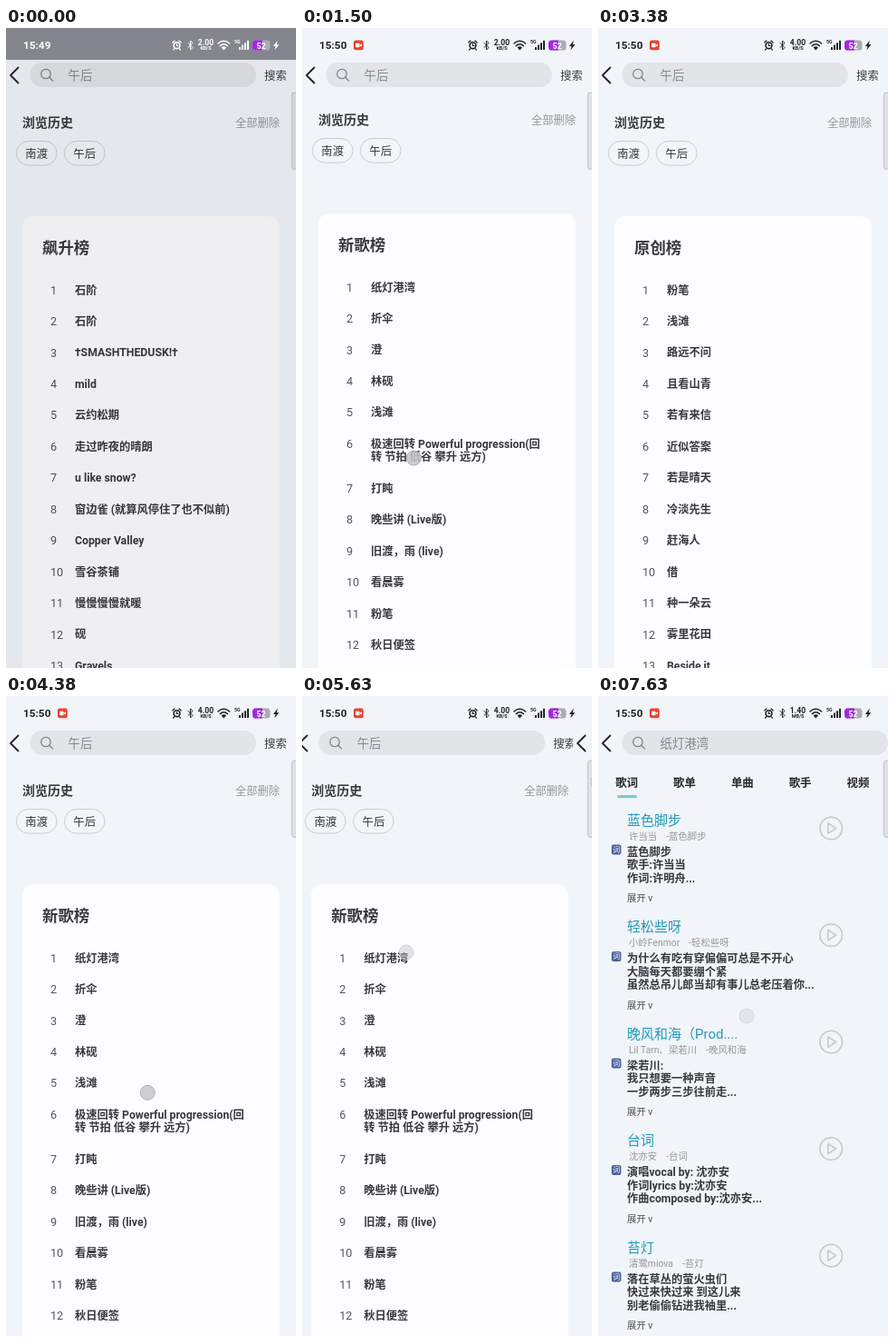
Recreate the animation shown at these times as an HTML page. Size 320x704 px, loop 7.76 s.

```html
<!DOCTYPE html>
<html lang="zh-CN">
<head>
<meta charset="utf-8">
<title>音乐搜索</title>
<style>
html, body { margin: 0; width: 100%; height: 100%; overflow: hidden; background: #f1f4f9; }
svg { display: block; width: 100vw; height: 100vh; }
text { font-family: Roboto, "Noto Sans CJK SC", "Noto Sans CJK", sans-serif; white-space: pre; }
</style>
</head>
<body>
<svg id="stage" viewBox="0 0 320 704" preserveAspectRatio="none"></svg>
<script>
const LOOP = 7760, STEP = 125, CARD_GAP = 284, PIVOT_Y = 610, ROW = 34.45, LINE = 14.5;
const BG = '#f1f4f9', INK = '#38393e', GREY = '#95979c', PALE = '#c5c7cb';
const MIDDLE = 'text-anchor="middle"';

// Text placed by the vertical middle of its line
const label = (x, y, s, size, fill = INK, weight = 400, more = '') =>
  `<text x="${x}" y="${y + size * 0.37}" font-size="${size}" fill="${fill}" font-weight="${weight}" ${more}>${s}</text>`;
const box = (x, y, w, h, r, fill, more = '') =>
  `<rect x="${x}" y="${y}" width="${w}" height="${h}" rx="${r}" fill="${fill}" ${more}/>`;
const line = (d, color, width) =>
  `<path d="${d}" fill="none" stroke="${color}" stroke-width="${width}" stroke-linecap="round" stroke-linejoin="round"/>`;
const ring = (x, y, r, color, width) =>
  `<circle cx="${x}" cy="${y}" r="${r}" fill="none" stroke="${color}" stroke-width="${width}"/>`;

const charts = [
  ['飙升榜', ['石阶', '石阶', '†SMASHTHEDUSK!†', 'mild', '云约松期', '走过昨夜的晴朗', 'u like snow?',
    '窗边雀 (就算风停住了也不似前)', 'Copper Valley', '雪谷茶铺', '慢慢慢慢就暖', '砚', 'Gravels']],
  ['新歌榜', ['纸灯港湾', '折伞', '澄', '林砚', '浅滩', '极速回转 Powerful progression(回|转 节拍 低谷 攀升 远方)',
    '打盹', '晚些讲 (Live版)', '旧渡，雨 (live)', '看晨雾', '粉笔', '秋日便签', '远处炊烟', '半盏', '石阶']],
  ['原创榜', ['粉笔', '浅滩', '路远不问', '且看山青', '若有来信', '近似答案', '若是晴天', '冷淡先生',
    '赶海人', '借', '种一朵云', '雾里花田', 'Beside it']]
];

const results = [
  ['蓝色脚步', '许当当', '蓝色脚步', ['蓝色脚步', '歌手:许当当', '作词:许明舟...']],
  ['轻松些呀', '小岭Fenmor', '轻松些呀', ['为什么有吃有穿偏偏可总是不开心', '大脑每天都要绷个紧', '虽然总吊儿郎当却有事儿总老压着你...']],
  ['晚风和海（Prod....', 'Lil Tarn、梁若川', '晚风和海', ['梁若川:', '我只想要一种声音', '一步两步三步往前走...']],
  ['台词', '沈亦安', '台词', ['演唱vocal by: 沈亦安', '作词lyrics by:沈亦安', '作曲composed by:沈亦安...']],
  ['苔灯', '清鹭miova', '苔灯', ['落在草丛的萤火虫们', '快过来快过来 到这儿来', '别老偷偷钻进我袖里...']]
];

const tabs = ['歌词', '歌单', '单曲', '歌手', '视频'];

const lines = (x, y, list) => list.map((s, i) => label(x, y + i * LINE, s, 12.25, INK, 700)).join('');

function chartCard([title, songs]) {
  let y = 288;
  const rows = songs.map((song, i) => {
    const parts = song.split('|');
    const row = label(49, y, i + 1, 12.6, '#55565b') + lines(76, y, parts);
    y += ROW + (parts.length - 1) * LINE;
    return row;
  });
  return `<g class="card">${box(18, 207, 284, 806, 12, '#fdfcfe')}${label(40, 242, title, 17.4, INK, 700)}${rows.join('')}</g>`;
}

const searchBar = (query, width) =>
  line('M13.5 43.5L5 52L13.5 60.5', '#24252a', 1.8) +
  box(26.5, 38, width, 27, 13.5, '#e2e4e8') +
  ring(44, 50.5, 5.2, '#84868c', 1.3) +
  line('M48 54.5L51.5 58', '#84868c', 1.3) +
  label(68.5, 52, query, 13.4, '#85878d');

const chip = (x, s) =>
  box(x, 124.5, 44.5, 26.5, 13.25, '#f3f5f9', 'stroke="#cbcdd2"') +
  label(x + 22.25, 138, s, 12.4, INK, 400, MIDDLE);

const resultItem = ([title, artist, song, lyrics], i) =>
  `<g transform="translate(0 ${i * 117.5})">` +
  label(32, 136, title, 15, '#209bb9') +
  label(34, 154, `${artist}<tspan dx="10">-${song}</tspan>`, 10.4, GREY) +
  box(15, 163.5, 10.5, 11, 2, '#4b639f') +
  label(20.25, 169, '词', 8, '#fff', 400, MIDDLE) +
  lines(32, 171, lyrics) +
  label(32, 222.5, '展开 v', 10.4, '#4a4b50') +
  ring(257.2, 145.5, 12.3, PALE, 1.6) +
  line('M253.8 139.8L262.5 145.5L253.8 151.2Z', PALE, 1.5) + '</g>';

function statusBar() {
  const c = 'currentColor';
  const bars = [0, 1, 2, 3].map(i => box(257 + i * 3, 21 - i * 2.4, 2, 3 + i * 2.4, 0.5, c)).join('');
  return box(0, 0, 320, 35, 0, '#85858d', 'id="shade"') + '<g id="status">' +
    label(19, 18.8, '', 11.8, c, 700, 'id="clock"') +
    `<g id="rec">${box(57, 13.5, 10.8, 10.8, 2.6, '#e8442f')}${box(59, 16.8, 4.6, 4.4, 1, '#fff')}<path d="M64 18.6L66 17.2V20.8L64 19.4Z" fill="#fff"/></g>` +
    ring(188.5, 19.2, 3.4, c, 1.6) +
    line('M183.8 16L186 14M193.2 16L191 14M185.5 23L184.5 24.2M191.5 23L192.5 24.2M188.5 17.6V19.5H190', c, 1.2) +
    line('M201 16.5L206 21.5L203.5 24V14L206 16.5L201 21.5', c, 1) +
    label(220.5, 15.6, '', 8.6, c, 700, `id="speed" ${MIDDLE}`) +
    label(220.5, 22, '', 5.4, c, 700, `id="unit" ${MIDDLE}`) +
    line('M234 17Q240.3 11.6 246.6 17M236.2 19.6Q240.3 16 244.4 19.6', c, 1.5) +
    `<path d="M237.6 21.4Q240.3 19.2 243 21.4L240.3 24.4Z" fill="${c}"/>` +
    label(252, 15.2, '5G', 5.2, c, 700) + bars +
    box(272, 13.5, 19.5, 11, 3.6, '#aaacb3') +
    `<path d="M283 13.5H275.6Q272 13.5 272 17.1V20.9Q272 24.5 275.6 24.5H283Z" fill="#a329e2"/>` +
    label(281.6, 19.2, '52', 9, '#fff', 700, MIDDLE) +
    `<path d="M299.8 13.8L294.8 20H297.6L296.2 24.6L301.4 18.2H298.6Z" fill="${c}"/></g>`;
}

document.getElementById('stage').innerHTML =
  box(0, 0, 320, 704, 0, BG) +
  `<g id="home"><g id="scroll">${label(18, 104, '浏览历史', 14, INK, 700)}${label(253, 104, '全部删除', 12.25, GREY)}
    ${chip(11.5, '南渡')}${chip(64.5, '午后')}${charts.map(chartCard).join('')}</g>
    ${box(0, 0, 320, 69, 0, BG)}${searchBar('午后', 249.5)}${label(285, 52, '搜索', 12.4)}</g>` +
  `<g id="found">${box(0, 0, 330, 704, 0, BG)}${searchBar('纸灯港湾', 293.5)}
    ${tabs.map((s, i) => label(31.7 + i * 63.8, 95, s, 12.4, '#25262a', 700, MIDDLE)).join('')}
    ${box(21, 109, 22, 3.2, 1.6, '#82c9cb')}<g id="list">${results.map(resultItem).join('')}</g></g>` +
  box(315.3, 71, 12, 84.5, 3, '#dedfe2', 'fill-opacity="0.85" stroke="#c3c5c8"') +
  `<circle id="touch" r="8" fill="#c6c7ca" stroke="#9fa0a4"/>` +
  box(0, 0, 320, 704, 0, '#000', 'id="dim"') +
  statusBar();

const el = id => document.getElementById(id);
const cards = [...document.querySelectorAll('.card')];
const set = (id, name, value) => el(id).setAttribute(name, value);
const show = (node, on) => { node.style.display = on ? '' : 'none'; };

const clamp = u => Math.max(0, Math.min(1, u));
const progress = (t, start, length) => clamp((t - start) / length);
const ease = (t, start, length) => {
  const u = progress(t, start, length);
  return u * u * (3 - 2 * u);
};
// A scroll that goes up and comes back
const pull = (t, start, length, depth) => -depth * Math.sin(Math.PI * progress(t, start, length)) ** 2;

const gestures = [
  { start: 500, end: 950, from: [235, 470], to: [105, 472] },
  { start: 1400, end: 1875, from: [123, 476], to: [126, 450] },
  { start: 2250, end: 2670, from: [292, 470], to: [225, 470] },
  { start: 3400, end: 3850, from: [90, 450], to: [215, 445] },
  { start: 4290, end: 4850, from: [156, 442], to: [160, 350] },
  { start: 5400, end: 5705, from: [115, 282], to: [115, 282] },
  { start: 7592, end: 8000, from: [164, 352], to: [164, 352] }
];

function drawTouch(t) {
  const g = gestures.find(g => t >= g.start && t < g.end);
  show(el('touch'), g);
  if (!g) return;
  const u = ease(t, g.start, g.end - g.start);
  const [x, y] = g.from.map((v, i) => v + (g.to[i] - v) * u);
  set('touch', 'transform', `translate(${x} ${y})`);
  set('touch', 'opacity', 0.85 * clamp(Math.min((t - g.start) / 80, (g.end - t) / 150)));
}

function drawCards(t) {
  const page = ease(t, 500, 750) + ease(t, 2392, 750) - ease(t, 3500, 500);
  cards.forEach((card, i) => {
    const d = i - page, far = Math.abs(d);
    card.setAttribute('transform',
      `translate(${160 + d * CARD_GAP} ${PIVOT_Y}) scale(${1 - 0.15 * far}) translate(-160 ${-PIVOT_Y})`);
    card.setAttribute('opacity', clamp(1 - 0.5 * far));
    show(card, far < 1.2);
  });
}

function drawStatus(t) {
  const started = t >= 500, fade = 1 - progress(t, 0, 500);
  el('clock').textContent = started ? '15:50' : '15:49';
  show(el('rec'), started);
  el('speed').textContent = t < 3125 ? '2.00' : t < 7000 ? '4.00' : '1.40';
  el('unit').textContent = t < 7000 ? 'KB/S' : 'MB/S';
  el('status').style.color = fade > 0.5 ? '#fff' : '#202126';
  set('shade', 'opacity', fade);
  set('dim', 'opacity', 0.055 * fade);
}

function draw(time) {
  const t = Math.min(Math.floor(time / STEP), 61) * STEP;
  const slide = ease(t, 5550, 480);
  drawCards(t);
  drawTouch(t);
  drawStatus(t);
  set('scroll', 'transform', `translate(0 ${pull(t, 1400, 725, 17) + pull(t, 4400, 850, 80)})`);
  set('home', 'transform', `translate(${-120 * slide} 0)`);
  set('found', 'transform', `translate(${320 * (1 - slide)} 0)`);
  show(el('found'), slide > 0);
  show(el('list'), t >= 6125);
}

function tick() {
  draw(performance.now() % LOOP);
  requestAnimationFrame(tick);
}
tick();
</script>
</body>
</html>
```
